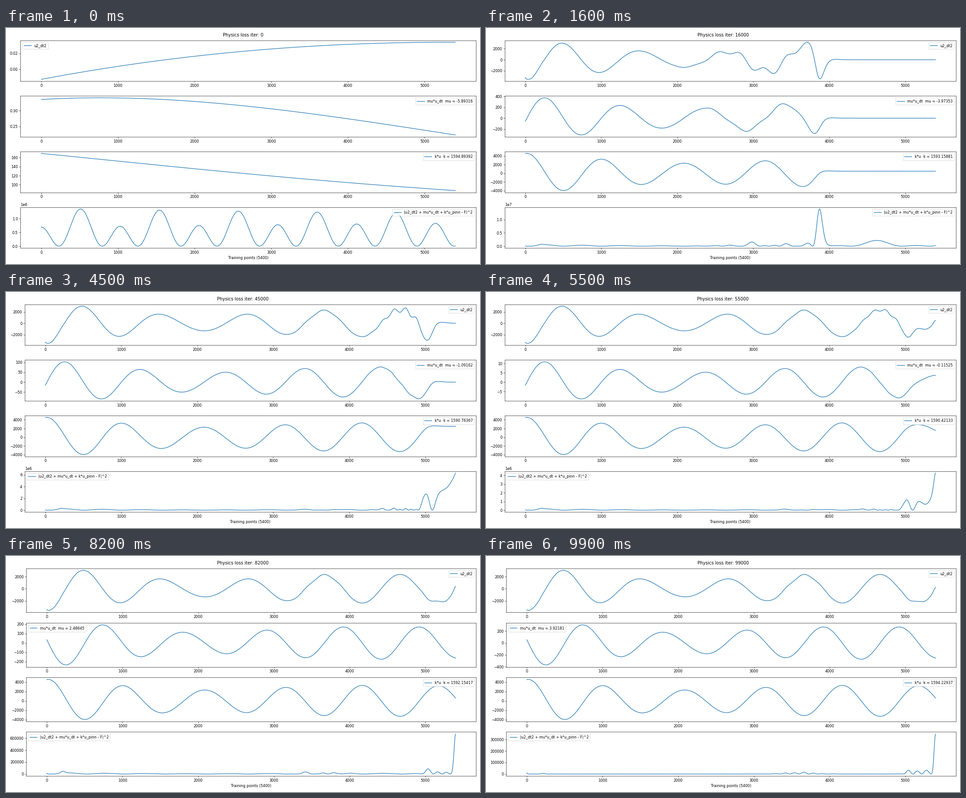
Animation, 1058 px wide and 529 px high, one loop 10000 ms. Source, as a matplotlib script:

```python
import numpy as np
import matplotlib.pyplot as plt
from matplotlib.animation import FuncAnimation

N = 5400
X = np.linspace(0, N, 1351)
T = X / N
FRAMES = 100

# Damped oscillator u'' + MU u' + K u = 1000 cos(OMEGA t)
MU, K, OMEGA = 4.0, 1600.0, 33.0
FORCE = 1000 * np.cos(OMEGA * T)

# Learned parameters by stage (thousands of iterations)
STAGES = [0, 16, 29, 45, 65, 82, 99]
MU_FIT = [-5.89316, -3.97353, -2.66835, -1.09162, 0.86111, 2.48645, 3.92181]
K_FIT = [1594.89392, 1593.15881, 1592.71680, 1590.76367, 1590.07898,
         1592.15417, 1594.22937]


def fitted(i):
    return np.interp(i, STAGES, MU_FIT), np.interp(i, STAGES, K_FIT)


def travel(i, *values):
    """Value at three stages of the moving front."""
    return np.interp(i, [16, 29, 45], values)


def smooth(t):
    t = np.clip(t, 0, 1)
    return t * t * (3 - 2 * t)


def bump(centre, width):
    return np.exp(-((X - centre) / width)**2)


def exact():
    """Displacement, velocity and acceleration of the oscillator."""
    gap = K - OMEGA**2
    norm = gap**2 + (MU * OMEGA)**2
    steady = 1000 * (gap - 1j * MU * OMEGA) / norm * np.exp(1j * OMEGA * T)
    root = -MU / 2 + 1j * np.sqrt(K - MU**2 / 4)
    free = np.exp(root * T)
    return [(steady * (1j * OMEGA)**n + free * root**n).real for n in range(3)]


U, V, A = exact()


def untrained():
    p, c = 2.1, 0.047
    q = p + 1
    a = 0.034 - c * (1 - T)**p
    v = -0.0568 + 0.034 * T - c / q * (1 - (1 - T)**q)
    u = (0.10596 - 0.0568 * T + 0.017 * T**2
         - c / q * (T - (1 - (1 - T)**(q + 1)) / (q + 1)))
    return u, v, a


def fit_error(i):
    """Small lasting error of the second derivative."""
    gap = MU - fitted(i)[0]
    start = ((120 + 30 * gap) * np.exp(-X / 15) - 22 * gap * bump(90, 45)
             + (75 + 8 * gap) * bump(210, 40))
    wave = 120 * np.cos(np.pi * (X - 3410) / 125) * bump(3600, 350)
    return start + wave


def end_error(i):
    """Ringing at the right edge that decays with training."""
    height = 550 + 815 * np.exp(-max(i - 65, 0) / 11)
    gate = 1 / (1 + np.exp((4960 - X) / 25))
    shape = 0.3 + 0.7 * bump(N, 45)
    return height * gate * shape * np.cos(np.pi * (N - X) / 121)


def ringing(i, front):
    """Wave packet behind the front, in acceleration and velocity."""
    d = X - front + travel(i, 710, 402, 295)
    half = np.where(d < 0, travel(i, 155, 85, 78), travel(i, 150, 130, 72))
    height = travel(i, 700, 1300, 500) * min(1, i / 16)
    packet = height * np.exp(-(d / (4 * half))**2)
    phase = np.pi * d / half
    a = packet * (np.cos(phase) + travel(i, -0.3, 0.3, 0))
    v = packet * np.sin(phase) * half / (np.pi * N)
    return a, v


def partly_trained(i):
    """Exact solution up to the front, a constant level behind it."""
    front = travel(i, 3850, 4950, 5040) * min(1, i / 16)**0.6
    level = np.interp(i, [0, 16, 29, 45], [100, 470, 2600, 2500]) / fitted(i)[1]
    width = travel(i, 53, 65, 60)
    s = 1 / (1 + np.exp(-np.clip((X - front) / width, -60, 60)))
    s1 = s * (1 - s) * N / width
    s2 = s1 * (1 - 2 * s) * N / width
    ring_a, ring_v = ringing(i, front)
    u = U * (1 - s) + level * s
    v = (V + ring_v) * (1 - s) + (level - U) * s1
    a = (A + fit_error(i) + ring_a) * (1 - s) - 2 * V * s1 + (level - U) * s2
    return np.array([u, v, a])


def state(i):
    if i == 0:
        return untrained()
    trained = np.array([U, V, A + fit_error(i) + end_error(i)])
    w = smooth((i - 45) / 20)
    return (1 - w) * partly_trained(i) + w * trained


fig, axes = plt.subplots(4, 1, figsize=(18, 9), dpi=58.7778)
title = fig.suptitle("Physics loss iter: 0")
lines = [ax.plot(X, 0 * X)[0] for ax in axes]
axes[3].set_xlabel(f"Training points ({N})")
layout = {"key": None}


def update(i):
    mu, k = fitted(i)
    u, v, a = state(i)
    loss = (a + mu * v + k * u - FORCE)**2
    plain = loss.max() * 1.05 < 1e6

    labels = ["u2_dt2", f"mu*u_dt  mu = {mu:.5f}", f"k*u  k = {k:.5f}",
              "|u2_dt2 + mu*u_dt + k*u_pinn - F|^2"]
    places = ["upper left" if i == 0 else "upper right",
              "upper left" if mu > 0 else "upper right",
              "lower right" if i >= 58 and not plain else "upper right",
              "upper left" if i >= 25 else "upper right"]
    for ax, line, y, label, place in zip(axes, lines, (a, mu * v, k * u, loss),
                                         labels, places):
        line.set_ydata(y)
        line.set_label(label)
        pad = 0.05 * np.ptp(y)
        ax.set_ylim(y.min() - pad, y.max() + pad)
        ax.legend(loc=place)
    title.set_text(f"Physics loss iter: {i * 1000}")

    # The margins only depend on the kind of tick labels
    key = (i == 0, plain)
    if key != layout["key"]:
        fig.tight_layout()
        layout["key"] = key
    return lines


anim = FuncAnimation(fig, update, frames=FRAMES, interval=100, repeat=True,
                     repeat_delay=0, blit=False)
plt.show()
```
